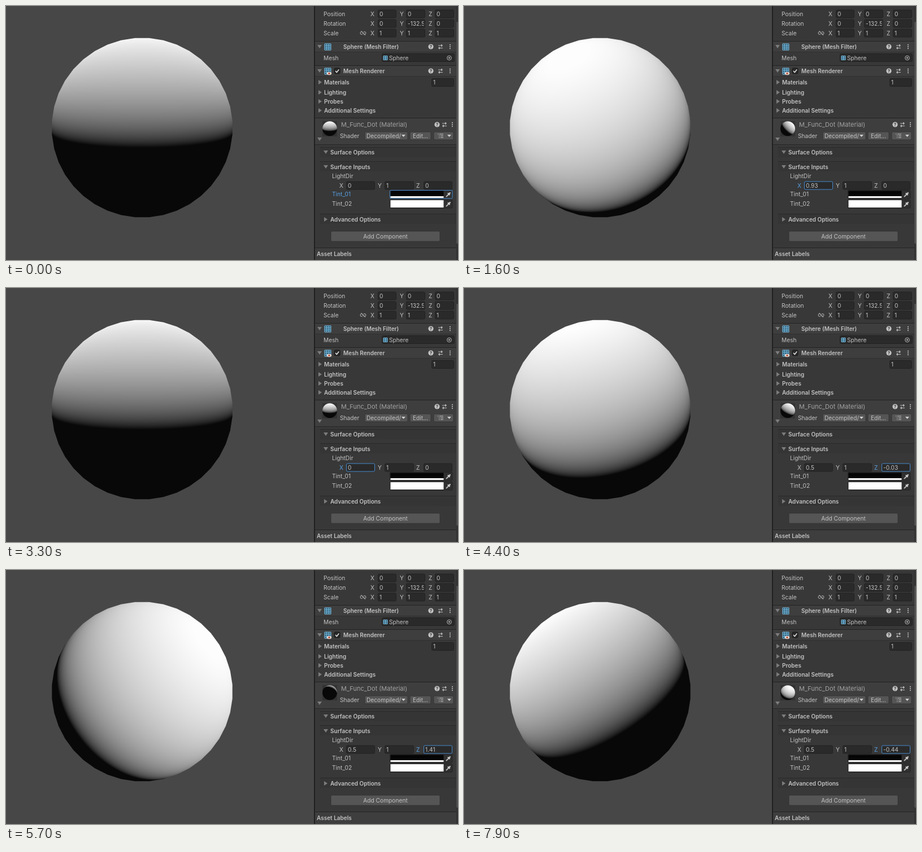
An HTML page with a canvas for the animation above (8 s loop, 800 by 450 pixels).

```html
<!DOCTYPE html>
<html lang="en">
<head>
<meta charset="utf-8">
<title>Light direction</title>
<style>
html, body { margin: 0; width: 100%; height: 100%; overflow: hidden; background: #474747; }
svg, canvas { position: absolute; left: 0; top: 0; width: 800px; height: 450px; display: block; }
text { font: 10.2px Inter, sans-serif; fill: #c3c3c3; white-space: pre; }
text.b { font-weight: 600; font-size: 10px; }
</style>
</head>
<body>
<svg id="ui" viewBox="0 0 800 450" width="800" height="450"></svg>
<canvas id="view" width="800" height="450"></canvas>
<script>
const NS = 'http://www.w3.org/2000/svg';
const ui = document.getElementById('ui');
const ctx = document.getElementById('view').getContext('2d');
const BLUE = '#58a0e4', RING = '#4488cc', LABEL = '#c3c3c3', EDGE = '#222222';

function add(tag, attrs, content) {
  const el = document.createElementNS(NS, tag);
  for (const k in attrs) el.setAttribute(k, attrs[k]);
  if (content !== undefined) el.textContent = content;
  ui.appendChild(el);
  return el;
}
const rect = (x, y, w, h, fill, more) => add('rect', { x, y, width: w, height: h, fill, ...more });
const path = (d, stroke, width = 1.2, fill = 'none') => add('path', { d, stroke, 'stroke-width': width, fill });
const label = (x, y, s, more) => add('text', { x, y: y + 3.7, ...more }, s);
const bold = (x, y, s) => label(x, y, s, { class: 'b' });
const rule = (y, color = '#232323') => rect(547, y, 251, 1, color);

function field(x, y, w, value) {
  const box = rect(x + .5, y - 7, w - 1, 14, '#2a2a2a', { rx: 2, stroke: EDGE });
  return { box, text: label(x + 3, y, value) };
}
function triangle(x, y, open) {
  const d = open ? `M${x - 4} ${y - 3}h8l-4 6z` : `M${x - 3} ${y - 4}v8l6 -4z`;
  path(d, 'none', 0, '#7c7c7c');
}
function headIcons(x1, x2, x3, y) {
  add('circle', { cx: x1, cy: y, r: 4.6, fill: '#c4c4c4' });
  label(x1, y - .6, '?', { 'text-anchor': 'middle', style: 'font-size:8px;font-weight:700;fill:#3a3a3a' });
  path(`M${x2 - 4} ${y - 2}h8M${x2 - 4} ${y + 2.5}h8`, '#bdbdbd', 1.1);
  path(`M${x2 + 2} ${y - 4}v4M${x2 - 2} ${y + .5}v4`, '#bdbdbd', 1.6);
  for (const d of [-3.3, 0, 3.3]) add('circle', { cx: x3, cy: y + d, r: 1.05, fill: '#c4c4c4' });
}
function grid(x, y, s) {
  rect(x, y, s, s, '#315a70');
  const n = s > 9 ? 3 : 2;
  let d = '';
  for (let i = 0; i <= n; i++) d += `M${x + i * s / n} ${y}v${s}M${x} ${y + i * s / n}h${s}`;
  path(d, '#7cc4ea', 1);
}
function dropper(x, y) {
  path(`M${x - 4} ${y + 4}l5 -5`, '#b8b8b8', 1.8);
  path(`M${x - 1} ${y - 2.5}l3.5 3.5M${x + 1.5} ${y - 1.5}l2 -2`, '#d0d0d0', 2.2);
}
const button = (x, y, w, h) => rect(x, y, w, h, '#555555', { rx: 2, stroke: '#303030', 'stroke-width': .8 });

// Panel background and section bars
rect(0, 0, 800, 450, '#474747');
rect(545, 0, 255, 450, '#383838');
rect(545, 0, 2, 450, '#202020');
for (const [y, h] of [[63, 18], [106, 18], [199, 46], [429, 21]]) {
  rect(547, y, 251, h, '#3e3e3e');
  rule(y - 1);
}
rule(81, '#303030'); rule(124, '#303030'); rule(245, '#272727');
for (const y of [251, 276, 369]) {
  rect(556, y, 242, 17, '#353535');
  rect(556, y - 1, 242, 1, '#292929');
}
rect(797, 0, 3, 450, '#323232');
rect(797.5, 28, 2, 393, '#5d5d5d', { rx: 1 });

// Transform
[['Position', 14, '0', '0'], ['Rotation', 31, '0', '-132.5'], ['Scale', 48, '1', '1']].forEach(([name, y, v, w]) => {
  label(562, y, name);
  label(645, y, 'X'); field(658, y, 33, v);
  label(697, y, 'Y'); field(708, y, 34, w);
  label(748, y, 'Z'); field(759, y, 34, v);
});
rect(739.5, 25, 1.5, 12, '#2a2a2a');
rect(742, 23, 4, 16, '#383838');
path('M631 45.5h-1.5a2.5 2.5 0 0 0 0 5h1.5M633 45.5h1.5a2.5 2.5 0 0 1 0 5h-1.5M630 48h4.5M628.5 44l7.5 8', '#b5b5b5', 1);

// Mesh filter
triangle(555, 72, true);
grid(564, 67, 11);
bold(597, 72, 'Sphere (Mesh Filter)');
headIcons(752, 769, 786, 72);
label(562, 92, 'Mesh');
rect(665.5, 84.5, 128, 14, '#2a2a2a', { rx: 2, stroke: EDGE });
grid(668, 88.5, 7);
label(678, 92, 'Sphere');
add('circle', { cx: 784.5, cy: 92, r: 3.8, fill: 'none', stroke: '#bcbcbc' });
add('circle', { cx: 784.5, cy: 92, r: 1.4, fill: '#bcbcbc' });

// Mesh renderer
triangle(555, 115, true);
grid(564, 110, 11);
add('ellipse', { cx: 572, cy: 119.5, rx: 4.2, ry: 2.7, fill: '#e6d5cf' });
add('circle', { cx: 572, cy: 119.5, r: 1.7, fill: '#b5543c' });
rect(581, 110, 10, 10, '#292929', { rx: 2, stroke: '#181818' });
path('M583 115l2.3 2.5l4 -5', '#e2e2e2', 1.5);
bold(597, 115, 'Mesh Renderer');
headIcons(752, 769, 786, 115);
[['Materials', 135], ['Lighting', 153], ['Probes', 169], ['Additional Settings', 185]].forEach(([s, y]) => {
  triangle(556, y, false);
  bold(563, y, s);
});
field(753, 135.5, 40, '1');

// Material
rect(560, 204, 26, 27, '#323232');
triangle(555, 236, true);
label(593, 210, 'M_Func_Dot (Material)', { style: 'font-size:11px;fill:#a2a2a2' });
headIcons(763, 776, 790, 210);
label(591, 230, 'Shader');
button(635, 223, 76, 14); label(638, 230, 'Decompiled/');
path('M700 228h7l-3.5 4z', 'none', 0, '#d0d0d0');
button(715, 223, 37, 14); label(720, 230, 'Edit...');
button(757, 223, 35, 14);
path('M764 227h1.5M767 227h7M766 230h1.5M769 230h5M766 233h1.5M769 233h5', '#c6c6c6', 1.1);
path('M781 228h7l-3.5 4z', 'none', 0, '#d0d0d0');

// Surface
triangle(566, 259, true); bold(574, 259, 'Surface Options');
triangle(566, 285, true); bold(574, 285, 'Surface Inputs');
label(577, 301, 'LightDir');
const axes = [['X', 590, 602, 51, '0'], ['Y', 658, 670, 52, '1'], ['Z', 726, 739, 51, '0']].map(
  ([s, x, fx, w, v]) => ({ name: label(x, 318, s), ...field(fx, 318, w, v) }));
const tint = label(577, 333.5, 'Tint_01');
label(577, 350.5, 'Tint_02');
const tintBox = rect(679.5, 326.5, 110.5, 14.5, '#303030', { rx: 1.5 });
rect(680.5, 327.5, 94, 10, '#060506');
rect(680.5, 337, 94, 3, '#ffffff');
rect(679.5, 343.5, 110.5, 14.5, '#303030', { rx: 1.5, stroke: EDGE });
rect(680.5, 344, 94, 13, '#ffffff');
dropper(783, 334); dropper(783, 351);
triangle(566, 378, false); bold(574, 378, 'Advanced Options');
button(575, 399, 193, 18);
label(671.5, 408, 'Add Component', { 'text-anchor': 'middle' });
bold(550, 439, 'Asset Labels');

// Shaded ball seen from distance D; yaw and tilt orient the camera
function makeBall(cx, cy, rx, ry, D, yaw, tilt, sides) {
  const x0 = Math.floor(cx - rx) - 1, y0 = Math.floor(cy - ry) - 1;
  const w = Math.ceil(2 * rx) + 3, h = Math.ceil(2 * ry) + 3;
  const img = ctx.createImageData(w, h), n = new Float32Array(w * h * 3);
  const t = 1 / Math.sqrt(D * D - 1), wedge = 2 * Math.PI / sides;
  for (let i = 0; i < w * h; i++) {
    const u = (x0 + i % w + .5 - cx) / rx, v = (cy - y0 - Math.floor(i / w) - .5) / ry;
    const A = 1 + t * t * (u * u + v * v);
    const s = (D - Math.sqrt(Math.max(0, D * D - A * (D * D - 1)))) / A;
    n.set([s * u * t, s * v * t, D - s], i * 3);
    const ang = Math.atan2(v, u);
    const off = ang - Math.round(ang / wedge) * wedge;
    const dist = Math.hypot(u, v) * Math.cos(off) - Math.cos(wedge / 2);
    img.data[i * 4 + 3] = 255 * Math.min(1, Math.max(0, .5 - dist * rx));
  }
  const c = Math.cos(yaw), sn = Math.sin(yaw), ct = Math.cos(tilt), st = Math.sin(tilt);
  return (x, z) => {
    const len = Math.hypot(x, 1, z);
    const side = (x * c + z * sn) / len, front = (x * sn - z * c) / len;
    const up = ct / len - front * st, toward = front * ct + st / len;
    for (let i = 0; i < w * h; i++) {
      const dot = side * n[i * 3] + up * n[i * 3 + 1] + toward * n[i * 3 + 2];
      const g = shade[Math.round(1023 * Math.min(1, Math.max(0, dot)))], p = i * 4;
      img.data[p] = img.data[p + 2] = g;
      img.data[p + 1] = g < 20 ? g - 1 : g;
    }
    ctx.putImageData(img, x0, y0);
  };
}
// Light with a soft toe, turned into display grey
const shade = Array.from({ length: 1024 }, (_, i) => {
  const d = i / 1023, l = .0027 + .9973 * 1.04 * d * d / (d + .04);
  return Math.min(253, 255 * (l < .0031308 ? 12.92 * l : 1.055 * l ** (1 / 2.4) - .055));
});
const balls = [
  makeBall(241, 215.5, 160.2, 159.2, 2.44, 114 * Math.PI / 180, .15, 40),
  makeBall(573, 217.3, 13, 13, 4, .1, .28, 60)
];

const xKeys = [[600, 0], [1600, .93], [1900, 1.12], [2700, .42], [3000, 0], [3599, 0], [3600, .5]];
const zKeys = [[4300, 0], [4400, -.03], [4800, -.6], [5000, -.38], [5700, 1.41], [5900, 1.52],
  [6600, -.56], [7000, -.95], [7600, -.44]];
function at(keys, t) {
  const i = keys.findIndex(k => k[0] > t);
  if (i < 0) return keys[keys.length - 1][1];
  if (i === 0) return keys[0][1];
  const [t0, a] = keys[i - 1], [t1, b] = keys[i];
  return Math.round((a + (b - a) * (t - t0) / (t1 - t0)) * 100) / 100;
}

function draw(t) {
  const x = at(xKeys, t), z = at(zKeys, t);
  const focus = t < 500 ? -1 : t < 3800 ? 0 : t < 4100 ? 1 : 2;
  axes.forEach((a, i) => {
    a.name.style.fill = i === focus ? BLUE : LABEL;
    a.box.setAttribute('stroke', i === focus ? RING : EDGE);
  });
  tint.style.fill = focus < 0 ? BLUE : LABEL;
  tintBox.setAttribute('stroke', focus < 0 ? RING : EDGE);
  axes[0].text.textContent = t >= 3500 && t < 3600 ? '0.' : String(x);
  axes[2].text.textContent = String(z);
  balls.forEach(b => b(x, z));
}

const start = performance.now();
let last = -1;
function tick() {
  const t = Math.floor((performance.now() - start) % 8000 / 100) * 100;
  if (t !== last) draw(last = t);
  requestAnimationFrame(tick);
}
tick();
</script>
</body>
</html>
```
